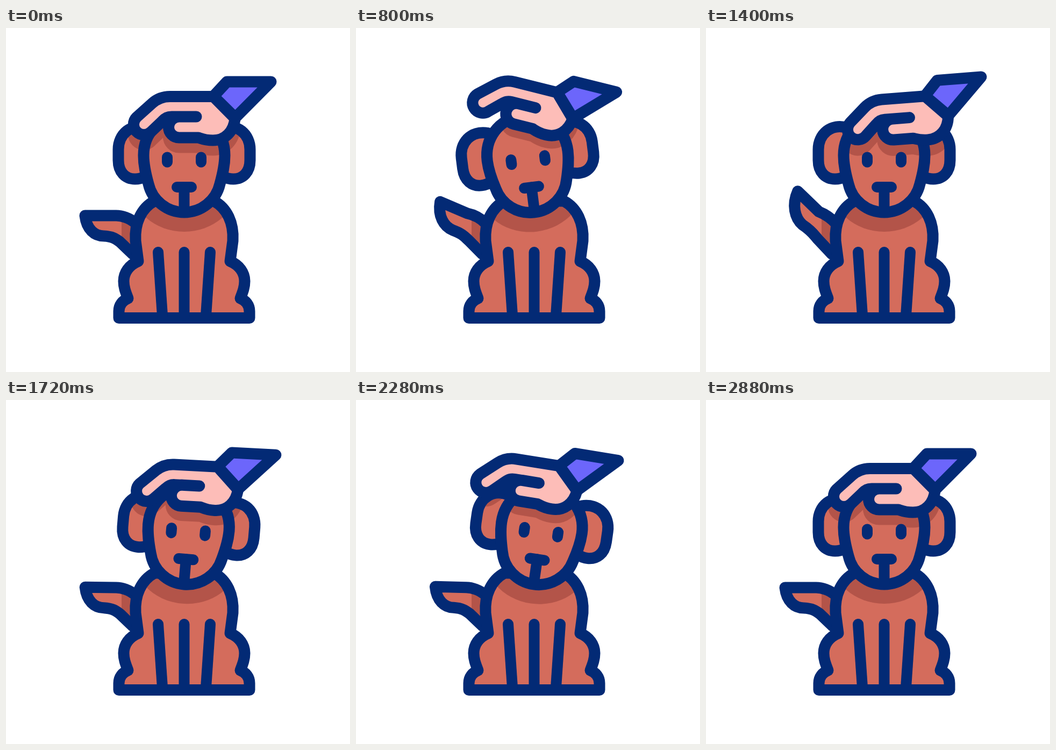
These frames come from a looping animation (640 px wide and 640 px high, 3 s). An HTML page with a canvas:

```html
<!DOCTYPE html>
<html lang="en">
<head>
<meta charset="utf-8">
<title>Petting a dog</title>
<style>
  html, body { margin: 0; width: 100%; height: 100%; overflow: hidden; background: #fff; }
  canvas { display: block; width: 100vw; height: 100vh; }
</style>
</head>
<body>
<canvas id="stage" width="640" height="640"></canvas>
<script>
const ctx = document.getElementById('stage').getContext('2d');
const NAVY = '#032a75', FUR = '#d46c5c', SHADE = '#b35449', SKIN = '#fdbdb8', SLEEVE = '#6c66fb';
const LOOP = 3000, STEP = 40, WAG = 560;
const WAG_SIZE = [0.6, 0.56, 1, 0.33, 0.7, 0];
const MID = 331.5, OUTLINE = 21, DETAIL = 20;
const NECK = [MID, 336], WRIST = [415, 110], TAIL_ROOT = [242, 370];

// left halves, mirrored about MID
const body = both('M331.5 539.5 H210 V527 C210 515 217 507 227 503 C222 490 219 482 219 471 ' +
  'C219 455 229 441 246 434 L241 396 C239 362 252 335 276 322 H331.5');
const ears = both('M264 186 C232 176 209 198 209 226 V246 C209 268 222 281 240 281 Q250 281 260 276');
const head = both('M331.5 162 C285 162 256 197 256 237 C256 256 260 272 265 290 C272 321 300 343 331.5 343');
const hand = new Path2D('M386 127.5 H305 C291 127.5 281 132 272 140 L243 166 A19 19 0 0 0 270 193 ' +
  'L291 173 C297 167 301 165 308 165 H354 H322 A19.5 19.5 0 0 0 322 204 H358 ' +
  'C364 206 370 209 385 209 C408 209 424 192 426 168 Z');
const cuff = new Path2D('M411 100 H493 L426.5 167 L386 127 Z');

function both(d) {
  const path = new Path2D(d);
  path.addPath(new Path2D(d), new DOMMatrix([-1, 0, 0, 1, 2 * MID, 0]));
  return path;
}

// the tail bends about its root, more towards the tip
function tailPath(wag) {
  const [rx, ry] = TAIL_ROOT;
  const bend = (x, y) => {
    const a = wag * 30.4 * Math.PI / 180 * (rx - x) / 95;
    const dx = x - rx, dy = y - ry;
    return [rx + dx * Math.cos(a) - dy * Math.sin(a), ry + dx * Math.sin(a) + dy * Math.cos(a)];
  };
  const path = new Path2D();
  path.moveTo(...bend(242, 364));
  path.bezierCurveTo(...bend(230, 353), ...bend(215, 349), ...bend(205, 349));
  path.lineTo(...bend(147, 349));
  path.bezierCurveTo(...bend(150, 375), ...bend(165, 387), ...bend(182, 387));
  path.bezierCurveTo(...bend(200, 388), ...bend(205, 393), ...bend(212, 398));
  path.lineTo(...bend(236, 421));
  return path;
}

// eased progress from 0 at a to 1 at b
function ease(t, a, b) {
  const u = Math.min(1, Math.max(0, (t - a) / (b - a)));
  return (1 - Math.cos(Math.PI * u)) / 2;
}

// rises from a to b, holds, falls from c to d
const pulse = (t, a, b, c, d) => ease(t, a, b) - ease(t, c, d);

function fill(path, color) {
  ctx.fillStyle = color;
  ctx.fill(path);
}

function ink(path, color = NAVY) {
  ctx.lineWidth = OUTLINE;
  ctx.strokeStyle = color;
  ctx.stroke(path);
}

function line(x1, y1, x2, y2) {
  ctx.lineWidth = DETAIL;
  ctx.strokeStyle = NAVY;
  ctx.beginPath();
  ctx.moveTo(x1, y1);
  ctx.lineTo(x2, y2);
  ctx.stroke();
}

function turned([x, y], deg, dx, dy, draw) {
  ctx.save();
  ctx.translate(x + dx, y + dy);
  ctx.rotate(deg * Math.PI / 180);
  ctx.translate(-x, -y);
  draw();
  ctx.restore();
}

// filled and outlined shape with a shadow falling on it
function shaded(path, drawShadow) {
  fill(path, FUR);
  ctx.save();
  ctx.clip(path);
  drawShadow();
  ctx.restore();
  ink(path);
}

function drawTail(wag) {
  shaded(tailPath(wag), () => {
    ctx.fillStyle = SHADE;
    ctx.fillRect(215, 320, 50, 120);
  });
}

function drawBody(tilt) {
  shaded(body, () => turned(NECK, tilt, 0, 0, () => {
    const shadow = new Path2D();
    shadow.ellipse(MID, 290, 100, 89, 0, 0, 2 * Math.PI);
    fill(shadow, SHADE);
  }));
  for (const side of [-1, 0, 1]) line(MID + 48.5 * side, 417, MID + 40.5 * side, 535);
}

function drawHead(tilt, hold) {
  const flat = ctx.getTransform();
  const handShadow = () => {
    ctx.setTransform(flat);
    turned(WRIST, hold.turn, hold.x, hold.y + 18 - 0.3 * hold.turn, () => {
      fill(hand, SHADE);
      ink(hand, SHADE);
    });
  };
  turned(NECK, tilt, 0, 0, () => {
    shaded(ears, handShadow);
    shaded(head, handShadow);
    for (const side of [-1, 1]) line(MID + 31.5 * side, 240.5, MID + 31.5 * side, 249.5);
    line(MID - 13.5, 296, MID + 13.5, 296);
    line(MID, 296, MID, 340);
  });
}

function drawHand(hold) {
  turned(WRIST, hold.turn, hold.x, hold.y, () => {
    fill(hand, SKIN);
    ink(hand);
    fill(cuff, SLEEVE);
    ink(cuff);
  });
}

function render(t) {
  const lift = pulse(t, 0, 800, 800, 1240) + pulse(t, 1440, 2080, 2080, 2580);
  const slide = pulse(t, 800, 1240, 1440, 2080);
  const hold = { x: 20 * slide - 8.5 * lift, y: -3 * slide, turn: 14 * lift - 4.5 * slide };
  const tilt = 10.6 * pulse(t, 1400, 2080, 2080, 2700) - 9 * pulse(t, 280, 1020, 1020, 1400);
  const wag = WAG_SIZE[Math.floor(t / WAG)] * Math.sin(Math.PI * t / WAG) ** 2;

  ctx.fillStyle = '#fff';
  ctx.fillRect(0, 0, 640, 640);
  ctx.lineCap = ctx.lineJoin = 'round';
  drawTail(wag);
  drawBody(tilt);
  drawHead(tilt, hold);
  drawHand(hold);
}

const start = performance.now();
function tick() {
  const t = (performance.now() - start) % LOOP;
  render(Math.floor(t / STEP) * STEP);
  requestAnimationFrame(tick);
}
tick();
</script>
</body>
</html>
```
